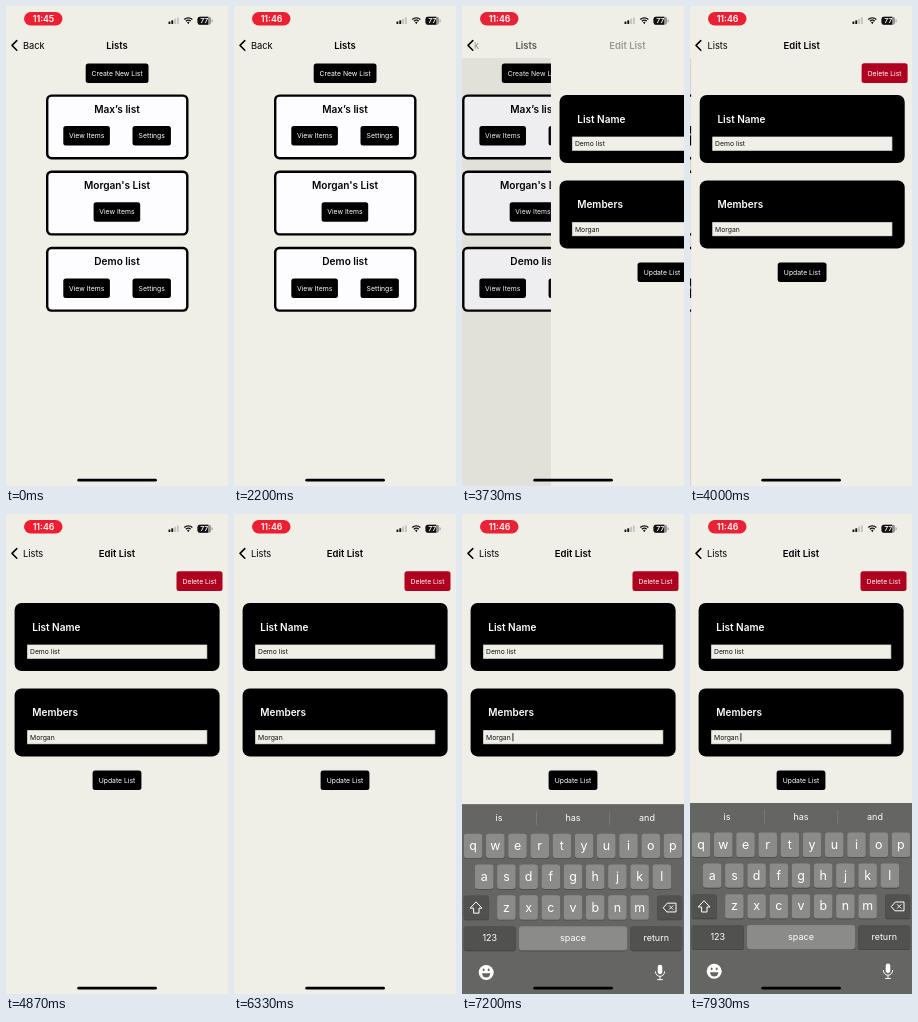
Animation, 222 px wide and 480 px high, one loop 8 s. Source, as an HTML page with a canvas:

```html
<!DOCTYPE html>
<html lang="en">
<head>
<meta charset="utf-8">
<title>List editing</title>
<style>
html, body { margin: 0; width: 100%; height: 100%; overflow: hidden; background: #efeee7; }
canvas { display: block; width: 222px; height: 480px; }
</style>
</head>
<body>
<canvas id="stage"></canvas>
<script>
const W = 222, H = 480, LOOP = 8000;
const BG = '#efeee7', INK = '#000', WHITE = '#fff';
const canvas = document.getElementById('stage');
const ctx = canvas.getContext('2d');
const dpr = window.devicePixelRatio || 1;
canvas.width = Math.round(W * dpr);
canvas.height = Math.round(H * dpr);

const clamp = v => Math.max(0, Math.min(1, v));
const ramp = (t, from, to) => clamp((t - from) / (to - from));

// Critically damped spring, 0 to 1
function spring(t, start) {
  const k = Math.max(0, t - start) / 50;
  return 1 - (1 + k) * Math.exp(-k);
}

function box(x, y, w, h, r, fill) {
  ctx.beginPath();
  ctx.roundRect(x, y, w, h, r);
  ctx.fillStyle = fill;
  ctx.fill();
}

function text(str, x, y, size, color = INK, weight = 400, align = 'center') {
  ctx.font = `${weight} ${size}px Inter, "Liberation Sans", sans-serif`;
  ctx.textAlign = align;
  ctx.textBaseline = 'alphabetic';
  ctx.fillStyle = color;
  ctx.fillText(str, x, y + size * 0.36);
}

function line(points, width, color, close) {
  ctx.beginPath();
  points.forEach(([x, y], i) => i ? ctx.lineTo(x, y) : ctx.moveTo(x, y));
  if (close) ctx.closePath();
  ctx.lineWidth = width;
  ctx.strokeStyle = color;
  ctx.lineCap = ctx.lineJoin = 'round';
  ctx.stroke();
}

function layer(alpha, draw) {
  ctx.save();
  ctx.globalAlpha *= alpha;
  draw();
  ctx.restore();
}

function button(label, x, y, w, h = 19.5, fill = INK) {
  box(x, y, w, h, 2.5, fill);
  text(label, x + w / 2, y + h / 2, 6.8, WHITE);
}

function statusBar(t) {
  const beat = 0.5 + 0.5 * Math.cos(Math.PI * (t - 570) / 1000);
  const mix = (a, b) => a + (b - a) * beat;
  box(18, 6, 38.5, 13.5, 6.75, `rgb(${mix(230, 240)},${mix(37, 28)},${mix(56, 46)})`);
  text(t < 670 ? '11:45' : '11:46', 37.5, 12.8, 8.8, WHITE, 600);

  for (let i = 0; i < 4; i++) {
    const h = 2.4 + i * 1.4;
    box(162.5 + i * 2.8, 18 - h, 1.9, h, 0.5, i < 2 ? '#111' : '#c4c3be');
  }
  ctx.lineCap = 'butt';
  ctx.strokeStyle = '#111';
  ctx.lineWidth = 1.4;
  for (const r of [3.3, 5.7]) {
    ctx.beginPath();
    ctx.arc(182.3, 17.6, r, Math.PI * 1.25, Math.PI * 1.75);
    ctx.stroke();
  }
  ctx.beginPath();
  ctx.moveTo(182.3, 18.2);
  ctx.arc(182.3, 17.6, 1.8, Math.PI * 1.25, Math.PI * 1.75);
  ctx.fillStyle = '#111';
  ctx.fill();

  box(191.5, 10.8, 13.6, 8, 2.4, '#96958f');
  box(191.5, 10.8, 10.6, 8, [2.4, 0, 0, 2.4], '#111');
  box(205.7, 13.4, 0.9, 2.8, 0.4, '#96958f');
  text('77', 198.3, 14.8, 6.8, WHITE, 600);
}

function header(p) {
  ctx.fillStyle = BG;
  ctx.fillRect(0, 0, W, 52);
  if (p < 0.99) {
    ctx.save();
    ctx.beginPath();
    ctx.rect(10 + 2 * Math.min(1, p * 5), 28, 60, 22);
    ctx.clip();
    layer(1 - p, () => text('Back', 17 - 36 * p, 39.3, 9.3, INK, 400, 'left'));
    ctx.restore();
    layer(1 - p * p, () => text('Lists', 111 - 78 * p, 39.3, 9.5, INK, 600));
  }
  layer(p * p, () => text('Edit List', 111 + 136 * (1 - p), 39.3, 9.5, INK, 600));
  layer(ramp(p, 0.65, 1), () =>
    text('Lists', 17 + 78 * (1 - p), 39.3, 9.3, INK, 400, 'left'));
  line([[10.8, 34.6], [6, 39.4], [10.8, 44.2]], 1.5, INK);
}

function listCard(title, y, owned, settingsAlpha = 1) {
  box(40, y, 142.5, 65, 5.5, INK);
  box(42.4, y + 2.4, 137.7, 60.2, 3.4, '#fdfcfe');
  text(title, 111, y + 14.5, 10.1, INK, 600);
  button('View Items', owned ? 57.3 : 87.6, y + 31.7, 46.6);
  if (owned) layer(settingsAlpha, () => button('Settings', 126.5, y + 31.7, 38.4));
}

function listsPage(t) {
  const press = ramp(t, 2970, 3070) * (1 - ramp(t, 3130, 3390));
  button('Create New List', 79.7, 57.4, 62.8);
  listCard('Max’s list', 88.4, true);
  listCard("Morgan's List", 164.6, false);
  listCard('Demo list', 240.8, true, 1 - 0.8 * press);
}

function field(label, value, y) {
  box(8.6, y, 205, 68, 7, INK);
  text(label, 26.3, y + 23.9, 10, WHITE, 600, 'left');
  box(21, y + 41.5, 180.3, 14.4, 0.5, '#a5a49e');
  box(21.6, y + 42.1, 179.1, 13.2, 0, BG);
  text(value, 24, y + 48.9, 6.8, '#111', 400, 'left');
  return 24 + ctx.measureText(value).width;
}

function editPage(t) {
  button('Delete List', 170.5, 57.3, 46, 19.6, '#b00020');
  field('List Name', 'Demo list', 89);
  const end = field('Members', 'Morgan', 174.4);
  button('Update List', 86.6, 256.5, 48.8, 19.6);
  const blink = 1 - ramp(t, 7430, 7550) * (1 - ramp(t, 7720, 7880));
  if (t >= 6800) layer(blink, () => box(end + 1.8, 219, 0.9, 8.4, 0.3, '#111'));
}

function keyRow(letters, y) {
  const left = 111 - (letters.length - 1) * 11.1;
  [...letters].forEach((ch, i) => {
    const x = left + i * 22.2;
    key(x - 9.3, y, 18.6, '#8b8b89');
    text(ch, x, y + 11.8, 12.4, WHITE);
  });
}

function key(x, y, w, fill) {
  box(x, y + 0.6, w, 24.4, 2.8, '#3c3c3a');
  box(x, y, w, 24.4, 2.8, fill);
}

function keyboard(offset) {
  const dark = '#51514f';
  ctx.save();
  ctx.translate(0, 289 + offset);
  ctx.fillStyle = '#656563';
  ctx.fillRect(0, 0, W, 200);
  ['is', 'has', 'and'].forEach((word, i) => text(word, 37 + i * 74, 14, 9, WHITE));
  for (const x of [74, 147.5]) box(x, 7, 0.6, 14, 0, '#858583');
  keyRow('qwertyuiop', 29.6);
  keyRow('asdfghjkl', 60.4);
  keyRow('zxcvbnm', 91.2);

  key(1.8, 91.2, 25, dark);
  line([[14.3, 98], [20, 104], [17, 104], [17, 109], [11.6, 109], [11.6, 104], [8.6, 104]], 1, WHITE, true);
  key(195.2, 91.2, 25, dark);
  line([[201.5, 103.4], [205.3, 99], [214, 99], [214, 107.8], [205.3, 107.8]], 1, WHITE, true);
  line([[207.4, 101.6], [211, 105.2]], 0.9, WHITE);
  line([[211, 101.6], [207.4, 105.2]], 0.9, WHITE);

  key(1.8, 122, 52, dark);
  text('123', 27.8, 134, 9, WHITE);
  key(57, 122, 108, '#8b8b89');
  text('space', 111, 133.6, 9, WHITE);
  key(168.2, 122, 52, dark);
  text('return', 194.2, 134, 9, WHITE);

  box(16.7, 160.8, 15, 15, 7.5, WHITE);
  for (const x of [21.7, 26.7]) box(x - 0.8, 164.4, 1.6, 2.8, 0.8, '#656563');
  ctx.beginPath();
  ctx.arc(24.2, 169.2, 4.2, 0, Math.PI);
  ctx.fillStyle = '#656563';
  ctx.fill();

  box(195.7, 160.6, 4.6, 9.4, 2.3, WHITE);
  ctx.beginPath();
  ctx.arc(198, 167.6, 4.6, 0, Math.PI);
  ctx.lineWidth = 1;
  ctx.strokeStyle = WHITE;
  ctx.stroke();
  line([[198, 172.4], [198, 175.4]], 1, WHITE);
  line([[195.6, 175.5], [200.4, 175.5]], 1, WHITE);
  ctx.restore();
}

function draw(t) {
  ctx.setTransform(dpr, 0, 0, dpr, 0, 0);
  ctx.fillStyle = BG;
  ctx.fillRect(0, 0, W, H);
  const p = spring(t, 3630);
  const edge = W * (1 - p);

  if (p < 0.999) {
    ctx.save();
    ctx.translate(-0.3 * W * p, 0);
    listsPage(t);
    ctx.restore();
    ctx.fillStyle = `rgba(0,0,0,${0.1 * p})`;
    ctx.fillRect(0, 0, W, H);
  }
  if (p > 0) {
    ctx.save();
    ctx.translate(p < 0.999 ? edge : 0, 0);
    ctx.fillStyle = BG;
    ctx.fillRect(0, 0, W, H);
    editPage(t);
    ctx.restore();
  }
  header(p);
  statusBar(t);
  if (t > 6840) keyboard(191 * (1 - spring(t, 6840)));
  box(71.3, 472.8, 79.6, 2.7, 1.35, INK);
}

const begin = performance.now();
function tick() {
  draw((performance.now() - begin) % LOOP);
  requestAnimationFrame(tick);
}
tick();
</script>
</body>
</html>
```
